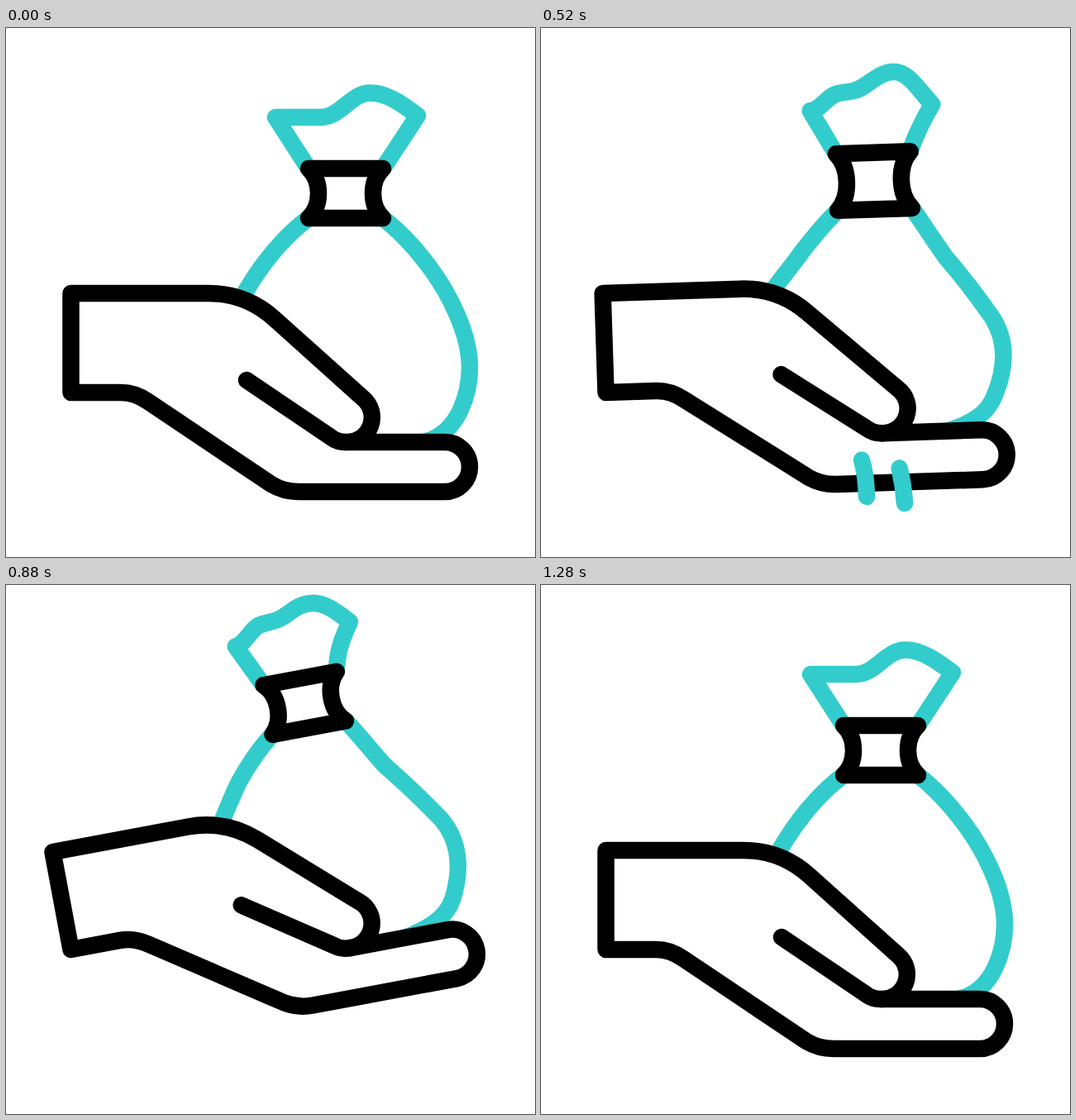
Write an HTML page that moves like this. It is 640 px wide and 640 px high and loops after 1.48 s.

```html
<!DOCTYPE html>
<html lang="en">
<head>
<meta charset="utf-8">
<title>Hand weighing a money bag</title>
<style>
  html, body { margin: 0; width: 100%; height: 100%; overflow: hidden; background: #fff; }
  svg { display: block; width: 100%; height: 100%; }
  path { stroke-width: 20.5; stroke-linecap: round; stroke-linejoin: round; fill: none; }
  .teal { stroke: #33cccc; }
  .black { stroke: #000; }
  .solid { fill: #fff; }
</style>
</head>
<body>
<svg viewBox="0 0 640 640">
  <g id="arm">
    <path id="body" class="teal"/>
    <path id="neck" class="teal"/>
    <path id="band" class="black solid"/>
    <path class="black solid" d="M78.5 321H245C278 321 304 333 325 352L432 448A30 30 0 0 1 411 501H531A30 30 0 0 1 531 561H354C342 561 331 558 321 552L172 452C162 445 151 441 139 441H78.5Z"/>
    <path class="black" d="M411 501C404 501 398 499 393 495L291 426"/>
  </g>
  <g id="swishes"></g>
</svg>
<script>
const LOOP = 1480, STEP = 40;
const $ = id => document.getElementById(id);

// Bag outlines; all strings of a kind share one structure so they can be blended.
const bodyRest = `M366 230C345 246 328 264 313 284C303 297 295 309 281 334
  M456 230C474 244 496 267 513 290C535 320 561 368 561 411
  C561 432 557 447 549 464C540 482 526 498 500 502`;
const bodyLow = `M366 230C355 245 342 263 331 275C318 292 297 308 278 328
  M456 230C471 253 485 273 498 290C516 312 536 340 551 364
  C565 388 568 416 555 452C546 477 534 490 503 501`;
const bodyHigh = `M366 230C344 241 318 264 302 286C296 296 292 310 284 332
  M456 230C469 250 479 274 488 291C505 313 535 355 546 371
  C565 405 557 443 536 475C527 486 504 497 458 502`;

const neckRest = `M366 170L326 108C340 108 354 108 366 108L381 108
  C405 108 417 78.5 441 78.5C460 78.5 478 91 498 106C484 127 470 149 456 170`;
const neckLow = `M366 154.5L332 102C346 101 354 83 367 81L385 78.5
  C402 75.6 416 52.6 435.5 49.5C454 47 465 71 488.5 99.5C475 123 465 139 456 154.5`;
const neckHigh = `M366 174L345 120C357 121 367 102 381 101.4L394.7 100.3
  C410 100.6 423 85 445 92C459 97 466 104 476.5 116C461 138 457 151 456 174`;
const neckSettle = `M366 162L336.2 112.2C350 111 359 89.5 374 88.5L391 87.3
  C409 85 420 69 439 67.9C456 66.7 472 87 492.8 108.2C479 127 467 141 456 162`;

const poses = [
  { t: 120,  turn: 0,   lift: 0,    body: bodyRest, neck: neckRest },
  { t: 360,  turn: 8,   lift: 15.5, body: bodyLow,  neck: neckLow },
  { t: 760,  turn: -20, lift: -4,   body: bodyHigh, neck: neckHigh },
  { t: 1040, turn: 4,   lift: 8,    body: bodyLow,  neck: neckSettle },
  { t: 1280, turn: 0,   lift: 0,    body: bodyRest, neck: neckRest }
];

// head: when the stroke grows; tail: when it shrinks away
const swishes = [
  { d: "M225 288Q256 318 261 385", head: [120, 340], tail: [240, 430] },
  { d: "M280 296Q301 344 304.5 403", head: [120, 340], tail: [240, 430] },
  { d: "M394 567Q393 503 356 470", head: [440, 620], tail: [540, 720] },
  { d: "M440 575Q437 525 413 476", head: [440, 620], tail: [540, 720] }
];
for (const s of swishes) {
  s.el = document.createElementNS("http://www.w3.org/2000/svg", "path");
  s.el.setAttribute("d", s.d);
  s.el.setAttribute("class", "teal");
  $("swishes").append(s.el);
  s.length = s.el.getTotalLength();
}

const ease = (t, from, to) => {
  const x = Math.min(1, Math.max(0, (t - from) / (to - from)));
  return x * x * (3 - 2 * x);
};
const mix = (a, b, p) => a + (b - a) * p;
const mixPath = (a, b, p) => {
  const goal = b.match(/[\d.]+/g);
  let i = 0;
  return a.replace(/[\d.]+/g, n => mix(+n, +goal[i++], p).toFixed(2));
};

function bandPath(lift) {
  const top = 170 - lift, q = (60 + lift) / 4, hi = top + q, lo = 230 - q;
  return `M366 ${top}H456C440 ${hi} 440 ${lo} 456 230H366C382 ${lo} 382 ${hi} 366 ${top}Z`;
}

function draw(t) {
  let i = 0;
  while (i < poses.length - 2 && t >= poses[i + 1].t) i++;
  const a = poses[i], b = poses[i + 1], p = ease(t, a.t, b.t);
  $("arm").setAttribute("transform", `rotate(${mix(a.turn, b.turn, p)} 78.5 441)`);
  $("body").setAttribute("d", mixPath(a.body, b.body, p));
  $("neck").setAttribute("d", mixPath(a.neck, b.neck, p));
  $("band").setAttribute("d", bandPath(mix(a.lift, b.lift, p)));

  for (const s of swishes) {
    const head = ease(t, ...s.head) * s.length, tail = ease(t, ...s.tail) * s.length;
    s.el.style.display = head - tail > 0.5 ? "" : "none";
    s.el.setAttribute("stroke-dasharray", `0 ${tail} ${head - tail} ${2 * s.length}`);
    // skip the empty first dash so its round cap is not painted
    s.el.setAttribute("stroke-dasharray", `${head - tail} ${2 * s.length}`);
    s.el.setAttribute("stroke-dashoffset", -tail);
  }
}

const start = performance.now();
function tick() {
  const t = (performance.now() - start) % LOOP;
  draw(Math.floor(t / STEP) * STEP);
  requestAnimationFrame(tick);
}
tick();
</script>
</body>
</html>
```
